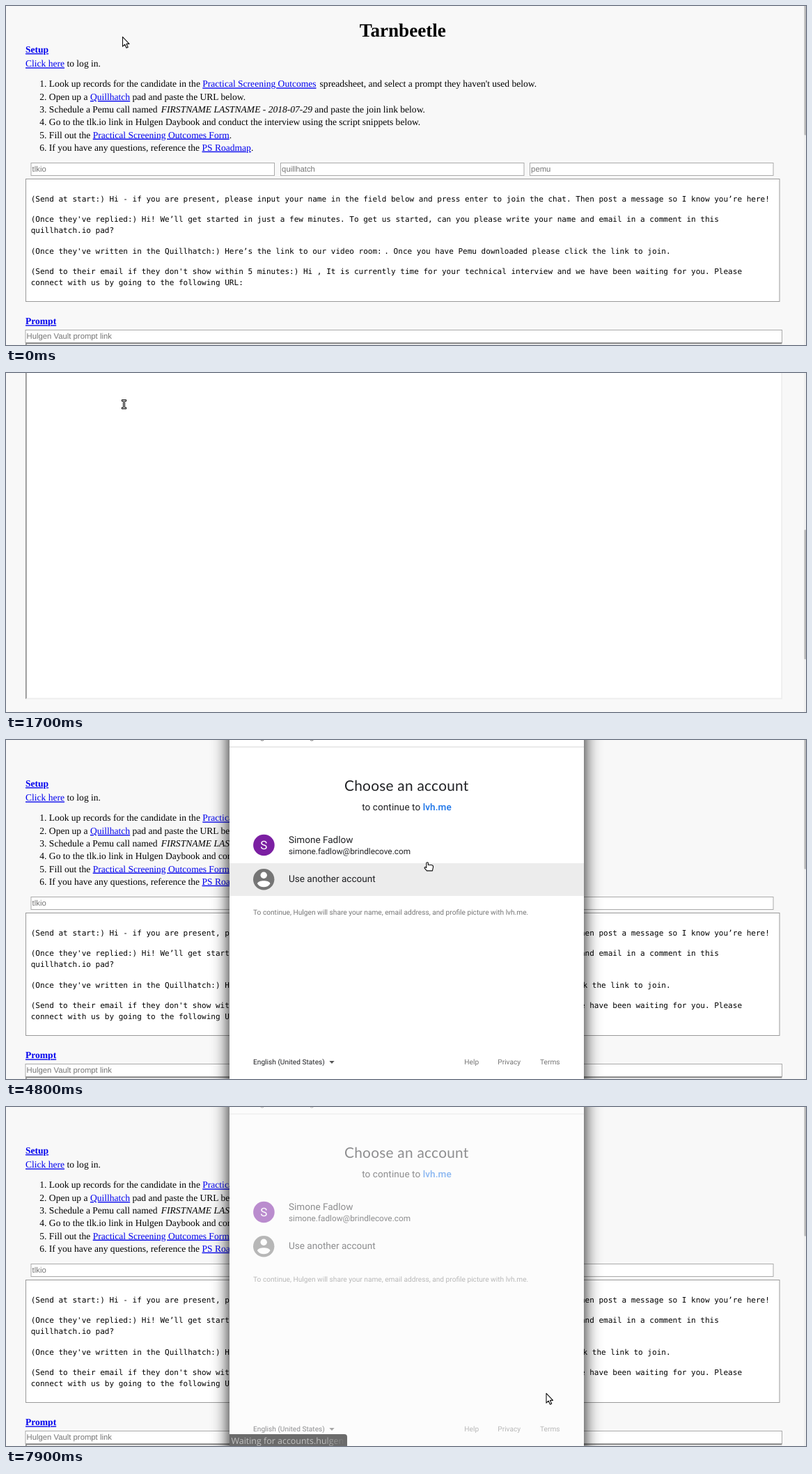
An HTML page for the animation above (8 s loop, 1149 by 487 pixels).

```html
<!DOCTYPE html>
<html lang="en">
<head>
<meta charset="utf-8">
<title>Interview helper</title>
<style>
  html, body { margin: 0; width: 100%; height: 100%; overflow: hidden; background: #f8f8f8; }
  svg { display: block; }
  text { text-rendering: geometricPrecision; }
  .serif { font: 13.56px "Liberation Serif", serif; }
  .serif .title { font-size: 27.12px; font-weight: bold; text-anchor: middle; }
  .link { fill: #00e; text-decoration: underline; }
  .link.hot { fill: #f00; }
  .bold { font-weight: bold; }
  .italic { font-style: italic; }
  .hint { font: 11.3px "Liberation Sans", sans-serif; fill: #757575; }
  .field { fill: #fff; stroke: #aaa; }
  .mono { font: 11.02px "DejaVu Sans Mono", monospace; }
  .panel { fill: #fff; filter: drop-shadow(0 3px 12px rgba(0, 0, 0, .95)); }
  .account { font: 13.56px Roboto, sans-serif; fill: #202124; }
  .account .head { font: 20.8px Lato, sans-serif; letter-spacing: .28px; }
  .account .mail { font-size: 11.8px; }
  .account .small { font-size: 10.17px; }
  .account .soft { fill: #757575; }
  .mid { text-anchor: middle; }
  .status { font: 12.45px "Open Sans", sans-serif; }
  .cursor path { fill: #fff; stroke: #111; stroke-width: 1.1; stroke-linejoin: round; }
</style>
</head>
<body>
<svg width="1149" height="487" viewBox="0 0 1149 487">
  <defs>
    <linearGradient id="fade" gradientUnits="userSpaceOnUse" x1="455" x2="489" y1="0" y2="0">
      <stop stop-color="#b0b0b0"/>
      <stop offset="1" stop-color="#b0b0b0" stop-opacity="0"/>
    </linearGradient>
  </defs>
  <rect width="1149" height="487" fill="#f8f8f8"/>

  <g id="page">
    <g class="serif">
      <text class="title" x="569.8" y="44">Tarnbeetle</text>
      <text class="link bold" x="28" y="67">Setup</text>
      <text x="28" y="87.3"><tspan id="login" class="link">Click here</tspan> to log in.</text>
      <text x="48.3" y="116.3">1. Look up records for the candidate in the <tspan class="link">Practical Screening Outcomes</tspan><tspan x="450.6">spreadsheet, and select a prompt they haven't used below.</tspan></text>
      <text x="48.3" y="135">2. Open up a <tspan class="link">Quillhatch</tspan> pad and paste the URL below.</text>
      <text x="48.3" y="153.2">3. Schedule a Pemu call named <tspan class="italic" x="222.8">FIRSTNAME LASTNAME - 2018-07-29</tspan> and paste the join link below.</text>
      <text x="48.3" y="171.4">4. Go to the tlk.io link in Hulgen Daybook and conduct the interview using the script snippets below.</text>
      <text x="48.3" y="189.6">5. Fill out the <tspan class="link">Practical Screening Outcomes Form</tspan>.</text>
      <text x="48.3" y="207.8">6. If you have any questions, reference the <tspan class="link">PS Roadmap</tspan>.</text>
      <text class="link bold" x="28" y="457.3">Prompt</text>
    </g>
    <g id="fields"></g>
    <rect x="28.5" y="248.5" width="1082.5" height="176" fill="#fff" stroke="#999"/>
    <g id="script" class="mono"></g>
    <rect x="28" y="484" width="1087" height="572.5" fill="#eee"/>
    <path d="M28 1056.5V484H1115L1113.3 485.8H29.8V1054.8Z" fill="#8c8c8c"/>
    <rect x="29.8" y="485.8" width="1083.5" height="569" fill="#fff"/>
  </g>

  <rect x="1146" width="3" height="487" fill="#efefef"/>
  <rect id="thumb" x="1146.5" width="3" height="186" rx="1" fill="#b9b9b9"/>

  <g id="popup">
    <rect id="panel" class="panel" x="321" y="-80" width="509" height="640"/>
    <g id="content" class="account">
      <rect id="rowA" x="321" y="128" width="509" height="49" fill="#f4f4f4"/>
      <rect id="rowB" x="321" y="177" width="509" height="47" fill="#ececec"/>
      <text class="mail soft" x="355" y="-1.5">Sign in with Hulgen</text>
      <path d="M321 10H830" stroke="#d5d5d5"/>
      <text class="head mid" x="575.3" y="73">Choose an account</text>
      <text class="mid" x="575.5" y="100.7" letter-spacing=".085">to continue to <tspan fill="#1a73e8" font-weight="500">lvh.me</tspan></text>
      <circle cx="370.4" cy="151" r="15.3" fill="#7b1fa2"/>
      <text class="mid" x="370.4" y="157" font-size="17" style="fill:#fff;font-size:17px">S</text>
      <text x="406" y="148">Simone Fadlow</text>
      <text class="mail" x="406" y="164">simone.fadlow@brindlecove.com</text>
      <circle cx="370.2" cy="200.3" r="15.2" fill="#757575"/>
      <circle cx="370.2" cy="194.2" r="4.7" fill="#fff"/>
      <path d="M361 206.4C361.5 200.8 378.9 200.8 379.4 206.4Q376 211.3 370.2 211.3T361 206.4Z" fill="#fff"/>
      <text x="406" y="204.3">Use another account</text>
      <text class="small soft" x="355" y="251">To continue, Hulgen will share your name, email address, and profile picture with lvh.me.</text>
      <text class="small" x="355" y="466">English (United States)</text>
      <path d="M464.3 461H471.7L468 465Z" fill="#555"/>
      <text class="small soft" x="658.3" y="466">Help</text>
      <text class="small soft" x="706.3" y="466">Privacy</text>
      <text class="small soft" x="767" y="466">Terms</text>
    </g>
    <g id="status" class="status">
      <path d="M321 470H486Q490 470 490 474V487H321Z" fill="#404040"/>
      <text x="323.5" y="484" fill="url(#fade)">Waiting for accounts.hulgen</text>
    </g>
  </g>

  <g id="cursor" class="cursor">
    <path data-kind="arrow" d="M.5.3V14.2L3.7 11.2L6 16.3L8.2 15.3L6 10.4H10Z"/>
    <path data-kind="beam" d="M-.5-5.5H2L2.5-5L3-5.5H5.5V-3.5H3.5V5.5H5.5V7.5H3L2.5 7L2 7.5H-.5V5.5H1.5V-3.5H-.5Z"/>
    <path data-kind="hand" d="M-1.2 1.2Q0-.3 1.4 1.2V4.2H6.2Q8.6 4.6 8.6 7L7.4 12.6H-.6L-4 8.6Q-3.6 6.8-2.2 7.4L-1.2 8.2Z"/>
  </g>
</svg>

<script>
const $ = id => document.getElementById(id);

// x, y, width, placeholder
const fields = [
  [36, 225.5, 349.5, "tlkio"],
  [394.5, 225.5, 349.5, "quillhatch"],
  [752.5, 225.5, 349.5, "pemu"],
  [28, 465.5, 1086.5, "Hulgen Vault prompt link"],
];
$("fields").innerHTML = fields.map(([x, y, w, hint]) =>
  `<rect class="field" x="${x}" y="${y}" width="${w}" height="18"/>
   <text class="hint" x="${x + 1.6}" y="${y + 12.7}">${hint}</text>`).join("");

// baseline, line
const script = [
  [281, "(Send at start:) Hi - if you are present, please input your name in the field below and press enter to join the chat. Then post a message so I know you’re here!"],
  [310.3, "(Once they've replied:) Hi! We’ll get started in just a few minutes. To get us started, can you please write your name and email in a comment in this"],
  [326.2, "quillhatch.io pad?"],
  [355.5, "(Once they've written in the Quillhatch:) Here’s the link to our video room:<tspan dx='-3'> . Once you have Pemu downloaded please click the link to join.</tspan>"],
  [384.8, "(Send to their email if they don't show within 5 minutes:) Hi , It is currently time for your technical interview and we have been waiting for you. Please"],
  [400.6, "connect with us by going to the following URL:"],
];
$("script").innerHTML = script.map(([y, line]) => `<text x="35.7" y="${y}">${line}</text>`).join("");

const scrolls = [[0, 0], [600, 76], [700, 430], [800, 781], [1600, 720], [1700, 588], [1800, 0]];

const moves = [
  [0, 167, 44, "arrow"],
  [700, 167, 44, "beam"],
  [2100, 158, 47, "arrow"],
  [2200, 121, 62, "arrow"],
  [2300, 82, 77, "hand"],
  [2400, 54, 86, "hand"],
  [2500, 46, 88, "hand"],
  [4800, 605, 175.3, "hand"],
  [5100, 614, 137, "hand"],
  [5300, 580, 161, "hand"],
  [6500, 580, 162, "arrow"],
  [7200, 740, 261, "arrow"],
  [7500, 752, 302, "arrow"],
  [7900, 775.5, 411, "arrow"],
];

const LOOP = 8000, OPEN = 4800, PICK = 6500, WAIT = 6900, FADE = 7900;
const THUMB_RATIO = 0.384;

const at = (steps, t) => steps.findLast(step => step[0] <= t);
const show = (el, on) => el.setAttribute("display", on ? "inline" : "none");

function draw(t) {
  const scroll = at(scrolls, t)[1];
  $("page").setAttribute("transform", `translate(0 ${-scroll})`);
  $("thumb").setAttribute("y", scroll * THUMB_RATIO - 0.5);

  const [, x, y, kind] = at(moves, t);
  $("cursor").setAttribute("transform", `translate(${x} ${y})`);
  for (const shape of $("cursor").children) show(shape, shape.dataset.kind === kind);
  $("login").classList.toggle("hot", kind === "hand" && t < OPEN);

  const picked = t >= PICK;
  show($("popup"), t >= OPEN);
  show($("rowA"), t >= 5100 && t < WAIT);
  show($("rowB"), !picked);
  show($("status"), t >= WAIT);
  $("panel").style.fill = picked ? "#fcfcfc" : "#fff";
  $("content").setAttribute("opacity", picked ? 0.5 : 1);
  $("status").setAttribute("opacity", t >= FADE ? 0.77 : 1);
}

const start = performance.now();
function tick() {
  draw((performance.now() - start) % LOOP);
  requestAnimationFrame(tick);
}
tick();
</script>
</body>
</html>
```
